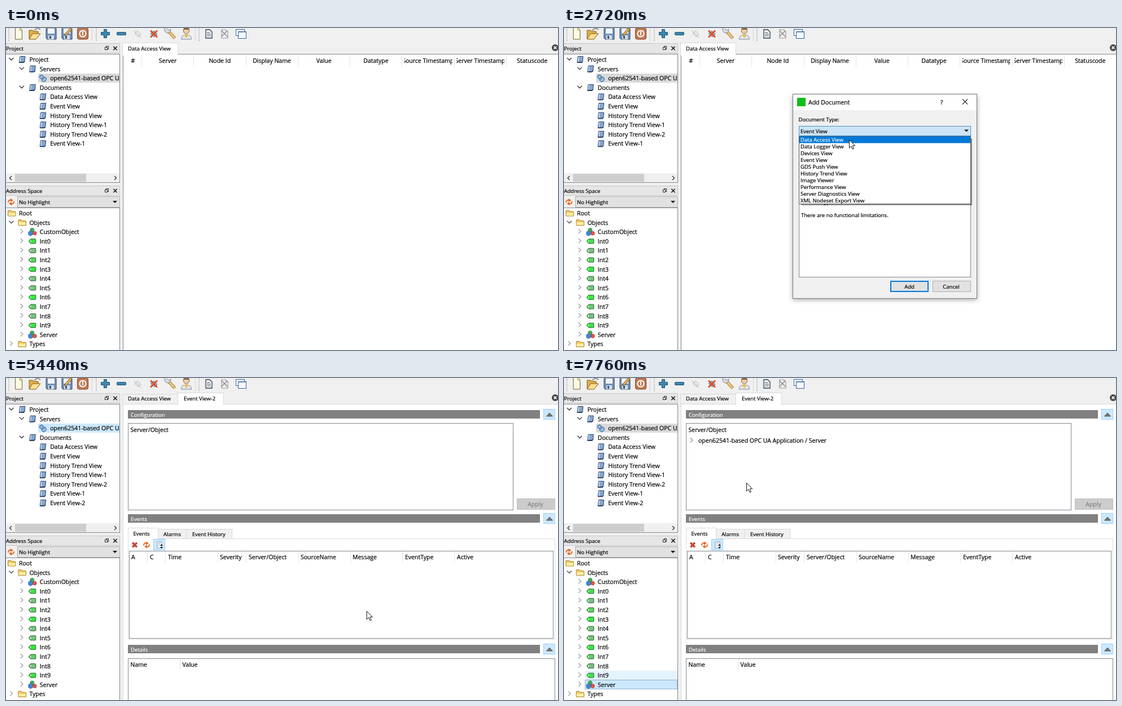
Write an HTML page that moves like this. It is 978 px wide and 572 px high and loops after 8 s.

```html
<!DOCTYPE html>
<html lang="en">
<head>
<meta charset="utf-8">
<title>Adding an event view</title>
<style>
html, body { margin: 0; width: 100%; height: 100%; overflow: hidden; background: #f0f0f0; }
svg { display: block; width: 978px; height: 572px; }
text { font: 10.5px "Open Sans", sans-serif; white-space: pre; stroke-width: .22px; }
.small { font-size: 9.5px; }
.bold { font-size: 10.3px; font-weight: bold; stroke-width: 0; }
.mid { text-anchor: middle; }
</style>
</head>
<body>
<svg id="stage" viewBox="0 0 978 572"></svg>
<script>
const LOOP = 8000, EDGE = '#828790', ROW = 16.6;

// Drawing helpers, all returning SVG markup
const text = (x, y, s, cls = '', fill = '#000') =>
  `<text x="${x}" y="${y}" class="${cls}" fill="${fill}" stroke="${fill}">${s}</text>`;
const fillRect = (x, y, w, h, fill, extra = '') =>
  `<rect x="${x}" y="${y}" width="${w}" height="${h}" fill="${fill}" ${extra}/>`;
const box = (x, y, w, h, fill, stroke = EDGE, extra = '') =>
  fillRect(x + .5, y + .5, w - 1, h - 1, fill, `stroke="${stroke}" ${extra}`);
const path = (d, fill = 'none', stroke = 'none', width = 1, extra = '') =>
  `<path d="${d}" fill="${fill}" stroke="${stroke}" stroke-width="${width}" ${extra}/>`;
const circle = (x, y, r, fill, stroke = 'none', width = 1) =>
  `<circle cx="${x}" cy="${y}" r="${r}" fill="${fill}" stroke="${stroke}" stroke-width="${width}"/>`;
const group = (id, content, extra = '') => `<g id="${id}" ${extra}>${content}</g>`;
const at = (x, y, content) => `<g transform="translate(${x} ${y})">${content}</g>`;
const clip = (x, y, w, h, content) =>
  `<svg x="${x}" y="${y}" width="${w}" height="${h}" viewBox="${x} ${y} ${w} ${h}" style="width:${w}px;height:${h}px">${content}</svg>`;
const separators = (xs, y, h) => xs.map(x => fillRect(x, y, 1, h, '#e3e3e3')).join('');
const cross = (x, y, r, color = '#111', width = 1.3) =>
  path(`M${x - r} ${y - r}l${2 * r} ${2 * r}m0 ${-2 * r}l${-2 * r} ${2 * r}`, 'none', color, width);
const downArrow = (x, y) => path(`M${x - 4} ${y - 2}h8l-4 4z`, '#111');
const chevron = (x, y, open) => open
  ? path(`M${x - 4} ${y - 2}l4 4 4-4`, 'none', '#333', 1.3)
  : path(`M${x - 2} ${y - 4}l4 4-4 4`, 'none', '#8c8c8c', 1.1);

// Icons, centred on x, y
const icons = {
  doc: (x, y) => at(x, y, path('M-3.500 -5.500h9l-1 9.500-1.500 1.500h-8l1-9z', '#84a6d2', '#2b4468') +
    path('M-2.500 -4.500l-1 9', 'none', '#dbe8f6', 1.4) + path('M-5 5h8l1.500-1.500', 'none', '#1d3150', 1.4)),
  folder: (x, y) => at(x, y, path('M-6.500 5v-9q0-1 1-1h4l1.500 2h6q1 0 1 1v7z', '#f3cd62', '#a37a1c') +
    path('M-6 4.500v-5h12.500v5z', '#ffecA6')),
  object: (x, y) => at(x, y, circle(-.5, -3.2, 3.6, '#3fae52', '#2a7a3a', .7) +
    circle(4, 2.4, 3.4, '#e8543c', '#a33a26', .7) + path('M-7 0l4-2 3.500 2v5l-4 2-3.500-2z', '#3f87d4', '#245a98', .7)),
  plug: (x, y) => at(x, y, `<g transform="rotate(45)">` +
    path('M-8 0h2M-6 -3h5v6h-5zM1 -4h4q3 4 0 8h-4zM-1 -2h2M-1 2h2', '#9fc3e8', '#2f6294') + '</g>'),
  tag: (x, y, color) => at(x, y, path('M-3 -4h8q1 0 1 1v6q0 1-1 1h-8l-3-3v-2z', color, '#2a5a30') +
    circle(-3.3, 0, 1, '#fff')),
  refresh: (x, y) => at(x, y, path('M-5 1q0-5 5-4.500M5 -1q0 5-5 4.500', 'none', '#e8641b', 2) +
    path('M-1 -6l5 3-5 3zM1 6l-5-3 5-3z', '#e8641b')),
  floppy: (x, y) => at(x, y, path('M-9 -10h18v19h-16l-2-2z', '#6f92ba', '#2c435e') +
    fillRect(-6, -10, 12, 9, '#f1f5fa') + fillRect(-5, 2, 10, 7, '#d5dce5') + fillRect(-3, 3, 3, 5, '#3a5472'))
};

const handle = x => Array.from({length: 7}, (_, i) => fillRect(x, 1 + i * 3.4, 2, 1.5, '#b4b4b4')).join('');

const toolbar = [4, 159, 341].map(handle).join('') + fillRect(152, 0, 1, 23, '#d4d4d4') + fillRect(335, 0, 1, 23, '#d4d4d4') +
  path('M16.500 -1h8l4 5v16h-12z', '#fffbe0', '#6b6436') + path('M24 0v4h5', 'none', '#a39a5c') +
  path('M41 19V4h6l2 2h8v4', '#e0ae48', '#7d5a13') + path('M41 20l6-10h14l-8 10z', '#fadf94', '#7d5a13') +
  path('M50 4l6-4 5 3', 'none', '#8b8b8b', 2) +
  icons.floppy(80, 11) + icons.floppy(108, 11) + path('M104 14l1-4 9-10 3 2-9 10z', '#edb24a', '#705223') +
  fillRect(126.5, 0, 19, 20, '#c07a55', 'rx="3" stroke="#7c4021"') + circle(136, 10, 5.6, 'none', '#fff', 2) + fillRect(135, 6, 2, 7, '#fff') +
  path('M173.500 2.500h5v5h5v5h-5v5h-5v-5h-5v-5h5z', '#3f86ad', '#1d5474') + box(196, 7, 17, 6, '#3f86ad', '#1d5474', 'rx="1.500"') +
  path('M226 4l13 13M228 10l5-5 6 6-4 5z', '#ececec', '#b2b2b2') +
  path('M256 10l6-5 6 6-5 5z', '#9db8d4', '#54718f') + cross(262, 10.5, 6, '#df4a20', 2.6) +
  path('M289 7l10 11', 'none', '#a5752a', 5.5) + path('M290 8l8.500 9.500', 'none', '#f0c47c', 3.5) +
  path('M281 0q-1 8 6 9 5-1 5-7l-4 2-3-3', '#d8dde3', '#79818b') +
  path('M310.500 20q0-8 9-8t9 8z', '#e4e7ee', '#81879a') + path('M315 12l4.500 6 4.500-6z', '#efbb4a') +
  circle(319.5, 5, 5.2, '#efcfa8', '#8a6950') + path('M314 3q1-5 6-4 5 0 5 4z', '#8a6340') +
  path('M354 3h7l4 4v11h-11z', '#fff', '#27384d', 1.3) + path('M356 8h5M356 11h7M356 14h7', 'none', '#27384d', 1.2) +
  path('M382 3h7l4 4v11h-11z', '#eee', '#999', 1.1) + cross(387, 10, 5.5, '#858585', 1.3) +
  box(407, 2, 16, 12, '#fff', '#315f9c') + box(411, 6, 15, 13, '#f5f9ff', '#315f9c') + fillRect(412, 7, 13, 1, '#8fb0dc');

const dockTitle = (y, s) => box(-1, y, 203, 18, '#e6e6e6', '#c6c6c6') + text(0, y + 13, s, 'small') +
  box(177, y + 5, 5, 6, '#fff', '#222') + box(175, y + 7, 5, 5, '#fff', '#222') + cross(193.5, y + 9, 3.2, '#111', 1.5);

function treeItem(origin, row, depth, icon, label, open, color) {
  const y = origin + row * ROW, x = 10 + depth * 18.4;
  return (open === undefined ? '' : chevron(x - 19, y - 1, open)) + icons[icon](x, y, color) + text(x + 13, y + 4, label);
}

const documents = ['Data Access View', 'Event View', 'History Trend View', 'History Trend View-1', 'History Trend View-2', 'Event View-1'];
const projectTree = box(-1, 46, 203, 229, '#fff') +
  '<rect id="serverRow" x="57" y="81" width="144" height="16"/>' +
  clip(0, 47, 201, 211,
    treeItem(56, 0, 1, 'doc', 'Project', true) + treeItem(56, 1, 2, 'doc', 'Servers', true) +
    treeItem(56, 2, 3, 'plug', 'open62541-based OPC UA Application') + treeItem(56, 3, 2, 'doc', 'Documents', true) +
    documents.map((name, i) => treeItem(56, 4 + i, 3, 'doc', name)).join('')) +
  fillRect(0, 258, 201, 16, '#f0f0f0') + fillRect(16, 259, 126, 14, '#cdcdcd') +
  path('M10 263l-3.500 3.500 3.500 3.500M192 263l3.500 3.500-3.500 3.500', 'none', '#333', 1.4);

const tagColors = ['#3fe048', '#7fbe83', '#58d55f', '#2fec3b', '#76c47b', '#74c678', '#2fec3b', '#62ce68', '#7ac07e', '#38e643'];
const nodeY = 329;
const addressTree = box(-1, 319, 203, 260, '#fff') +
  fillRect(37, 0, 164, ROW, '#e5f3ff', 'id="hoverRow"') +
  group('selectedNode', box(37, 536, 164, 17, '#cce8ff', '#3d6c91', 'stroke-dasharray="1 1"')) +
  treeItem(nodeY, 0, 0, 'folder', 'Root') + treeItem(nodeY, 1, 1, 'folder', 'Objects', true) +
  treeItem(nodeY, 2, 2, 'object', 'CustomObject', false) +
  tagColors.map((color, i) => treeItem(nodeY, 3 + i, 2, 'tag', 'Int' + i, false, color)).join('') +
  treeItem(nodeY, 13, 2, 'object', 'Server', false) + treeItem(nodeY, 14, 1, 'folder', 'Types', false) +
  treeItem(nodeY, 15, 1, 'folder', 'Views', false);

const sidebar = dockTitle(27, 'Project') + projectTree + dockTitle(280, 'Address Space') +
  icons.refresh(9, 309) + box(20, 299, 182, 20, '#e1e1e1', '#adadad') + text(23, 313, 'No Highlight', 'small') + downArrow(193, 309) + addressTree;

const columns = ['Server', 'Node Id', 'Display Name', 'Value', 'Datatype', 'Source Timestamp', 'Server Timestamp', 'Statuscode'];
const dataView = box(207, 46, 780, 540, '#fff') + box(206, 26, 99, 22, '#fff', '#d9d9d9') + fillRect(207, 45, 97, 4, '#fff') +
  text(216, 40, 'Data Access View', 'small') + text(225, 62, '#', 'mid') +
  separators(Array.from({length: 8}, (_, i) => 240 + Math.round(i * 92.25)), 48, 21) +
  columns.map((name, i) => {
    const x = 240 + i * 92.25;
    return clip(x + 4.5, 48, 85, 21, text(x + 46.5, 62, name, 'mid'));
  }).join('');

const sectionBar = (y, s) => fillRect(216, y, 730, 15, '#808080') + text(221, y + 11.5, s, 'small', '#fff') +
  box(952, y - 2, 21, 19, '#cce8ff', '#99d1ff') + path(`M957.500 ${y + 11}l5.500-6 5.500 6z`, '#777', '#444', .8);
const eventColumns = [['A', 222], ['C', 255], ['Time', 287], ['Severity', 379], ['Server/Object', 430],
  ['SourceName', 522], ['Message', 614], ['EventType', 707], ['Active', 799]];
const eventView = fillRect(206, 26, 760, 20, '#f0f0f0') + box(207, 46, 780, 540, '#fff', '#d9d9d9') +
  box(206, 28, 99, 19, '#f0f0f0', '#d9d9d9') + box(304, 26, 82, 22, '#fff', '#d9d9d9') + fillRect(305, 45, 80, 4, '#fff') +
  text(216, 40, 'Data Access View', 'small') + text(315, 40, 'Event View-2', 'small') +
  treeItem(56, 10, 3, 'doc', 'Event View-2') +
  sectionBar(57, 'Configuration') + box(216, 80, 683, 155, '#fff') + text(220.5, 96, 'Server/Object') +
  group('dropped', chevron(226, 110.5, false) + text(238, 114.5, 'open62541-based OPC UA Application / Server')) +
  box(905, 214, 68, 20, '#ccc', '#bfbfbf') + text(938, 228, 'Apply', 'mid', '#838383') +
  sectionBar(242, 'Events') +
  box(216, 285, 757, 180, '#fff', '#dcdcdc') + box(269, 268, 51, 18, '#f0f0f0', '#d9d9d9') + box(319, 268, 82, 18, '#f0f0f0', '#d9d9d9') +
  box(216, 266, 54, 21, '#fff', '#d9d9d9') + fillRect(217, 284, 52, 4, '#fff') +
  text(225.5, 280, 'Events', 'small') + text(279, 280.5, 'Alarms', 'small') + text(330, 280.5, 'Event History', 'small') +
  cross(228, 296.5, 3.8, '#8a2014', 3.2) + cross(228, 296.5, 3.5, '#df4a35', 1.8) + icons.refresh(249, 296.5) +
  box(261, 286, 21, 20, '#cce8ff', '#99d1ff') + path('M268 291h8v11h-8z', '#fff', '#8b9aaa') +
  path('M270 294h4M270 297h3', 'none', '#8b9aaa') + path('M275.500 295l2.500 3h-5zM275.500 303l2.500-3h-5z', '#111') +
  box(218, 307, 752, 156, '#fff') + separators([250, 282, 375, 425, 518, 610, 702, 794], 308, 20) +
  eventColumns.map(([name, x]) => text(x, 322, name)).join('') +
  sectionBar(474, 'Details') + box(216, 498, 757, 100, '#fff') + separators([308], 499, 20) + text(220.5, 513, 'Name') + text(312.5, 513, 'Value');

const description = ['This document type can be used to subscribe to events and alarms', 'of the UA server. It supports the selection of event fields and can',
  'acknowledge and confirm alarms. It also supports reading of', 'historical event data for a given time period.'];
const dialog = fillRect(405, 118, 327, 363, '#f0f0f0', 'style="filter:drop-shadow(0 2px 4px #0005)"') + box(405, 117, 327, 364, '#f0f0f0', '#777') +
  fillRect(406, 118, 325, 28, '#fff') + fillRect(413, 124, 15, 15, '#0fbe17') + text(433, 136, 'Add Document') +
  text(669, 136, '?', 'mid') + cross(710.5, 131, 4.6, '#111', 1.1) +
  text(415.5, 166, 'Document Type:', 'small') + '<rect id="combo" x="416.500" y="174.500" width="304" height="17"/>' +
  text(419, 186.5, 'Event View', 'small') + downArrow(713, 182.5) + text(415.5, 207, 'Description:', 'small') + box(416, 215, 305, 228, '#fff') +
  description.map((line, i) => text(420, 230 + i * 12, line, 'small')).join('') + fillRect(421, 285, 297, 1, '#969696') +
  text(420, 313, 'License Type:', 'small') + text(483.5, 313, 'Runtime License', 'bold', '#0a800a') +
  text(420, 336, 'There are no functional limitations.', 'small') +
  '<rect id="addButton" x="579" y="450" width="66" height="18" stroke="#0078d7" stroke-width="2"/>' + text(612, 463, 'Add', 'mid small') +
  box(653, 449, 68, 20, '#e1e1e1', '#adadad') + text(686, 463, 'Cancel', 'mid small');

const choices = ['Data Access View', 'Data Logger View', 'Devices View', 'Event View', 'GDS Push View', 'History Trend View',
  'Image Viewer', 'Performance View', 'Server Diagnostics View', 'XML Nodeset Export View'];
const dropdown = fillRect(420, 196, 303, 119, '#000', 'opacity=".4"') + box(416, 192, 305, 121, '#fff', '#555') +
  fillRect(417, 0, 303, 12, '#0078d7', 'id="choiceRow"') +
  choices.map((name, i) => text(419, 202 + i * 12, name, 'small choice')).join('');

// The dragged row keeps its offset to the pointer
const ghost = fillRect(-61, -4, 164, 17, '#cce8ff') + icons.object(-51, 5) + text(-38, 9, 'Server');
const arrow = path('M.5 .5v14.500l3.400-3.200 2.300 5.300 2.300-1-2.300-5.200h4.500z', '#fff', '#111', 1);

document.getElementById('stage').innerHTML = fillRect(0, 0, 978, 572, '#f0f0f0') +
  group('toolHover', box(345, -1, 29, 24, '#d8eafb', '#a4cdf2')) + toolbar + sidebar + group('dataView', dataView) + group('eventView', eventView) +
  circle(973, 35, 6, '#454545') + cross(973, 35, 2.4, '#fff', 1.5) +
  group('dialog', dialog) + group('dropdown', dropdown) +
  group('pointer', group('click', circle(0, 4, 11, '#f7e537'), 'opacity=".75"') + group('ghost', ghost, 'opacity=".7"') + arrow);

// Pointer stops: time, x, y
const route = [[160, 820, 500], [320, 690, 365], [480, 500, 170], [640, 390, 62], [760, 347, 30], [880, 347, 30], [920, 352, 16],
  [1640, 352, 16], [1760, 362, 30], [1880, 436, 122], [2000, 485, 179], [2480, 500, 184], [2640, 503, 192], [2720, 505, 198],
  [2880, 501, 222], [3120, 496, 250], [3400, 496, 250], [3640, 494, 234], [3880, 494, 234], [4080, 518, 295], [4240, 556, 390],
  [4400, 588, 444], [4600, 606, 453], [5280, 606, 453], [5440, 638, 415], [5560, 712, 270], [5680, 690, 180], [5800, 540, 176],
  [5920, 370, 240], [6040, 230, 316], [6200, 176, 400], [6400, 120, 500], [6600, 97, 539], [6840, 98, 540], [7080, 98, 540],
  [7240, 170, 420], [7400, 285, 235], [7520, 323, 186], [8000, 323, 186]];

function pointerAt(t) {
  const i = Math.max(1, route.findIndex(stop => stop[0] > t));
  const [t0, x0, y0] = route[i - 1], [t1, x1, y1] = route[i];
  const k = Math.max(0, (t - t0) / (t1 - t0));
  return [x0 + (x1 - x0) * k, y0 + (y1 - y0) * k];
}

const $ = id => document.getElementById(id);
const show = (id, on) => $(id).style.display = on ? '' : 'none';
const set = (id, attrs) => Object.entries(attrs).forEach(([name, value]) => $(id).setAttribute(name, value));
const choiceTexts = document.querySelectorAll('.choice');
const clicks = [[1080, 1180], [2400, 2500], [3880, 3980], [4680, 4780], [7000, 7120]];

function draw(t) {
  const during = (from, to) => t >= from && t < to;
  const [x, y] = pointerAt(t);
  show('pointer', t >= 160);
  set('pointer', {transform: `translate(${x} ${y})`});
  show('click', clicks.some(([from, to]) => during(from, to)));
  show('ghost', during(7120, 7640));

  show('toolHover', during(920, 1240));
  show('dialog', during(1240, 4800));
  set('dialog', {opacity: Math.min(1, Math.max(0, (t - 1200) / 240))});
  show('dataView', t < 4960);
  show('eventView', t >= 4960);
  show('dropped', t >= 7680);

  const open = during(2480, 3960);
  const comboHover = x > 416 && x < 721 && y > 174 && y < 192;
  set('combo', open ? {fill: '#cce4f7', stroke: '#4f91c6'} : comboHover ? {fill: '#d6e5f2', stroke: '#6f9ec4'} : {fill: '#e1e1e1', stroke: '#adadad'});
  set('addButton', {fill: x > 579 && y > 449 ? '#e5f1fb' : '#e1e1e1'});
  show('dropdown', open);
  const choice = t < 2640 ? 3 : Math.max(0, Math.floor((y - 192.5) / 12));
  set('choiceRow', {y: 192.5 + choice * 12});
  choiceTexts.forEach((el, i) => {
    const color = i === choice ? '#fff' : '#000';
    el.setAttribute('fill', color);
    el.setAttribute('stroke', color);
  });

  set('serverRow', {fill: during(4800, 7000) ? '#cce8ff' : '#d9d9d9'});
  show('selectedNode', t >= 7000);
  const node = t >= 7680 ? 12 : Math.floor((y - nodeY + ROW / 2) / ROW);
  show('hoverRow', t >= 7680 || during(6040, 7000) && x < 201 && node > 1);
  set('hoverRow', {y: nodeY + (node - .5) * ROW});
}

function frame(now) {
  draw(now % LOOP);
  requestAnimationFrame(frame);
}
draw(0);
requestAnimationFrame(frame);
</script>
</body>
</html>
```
